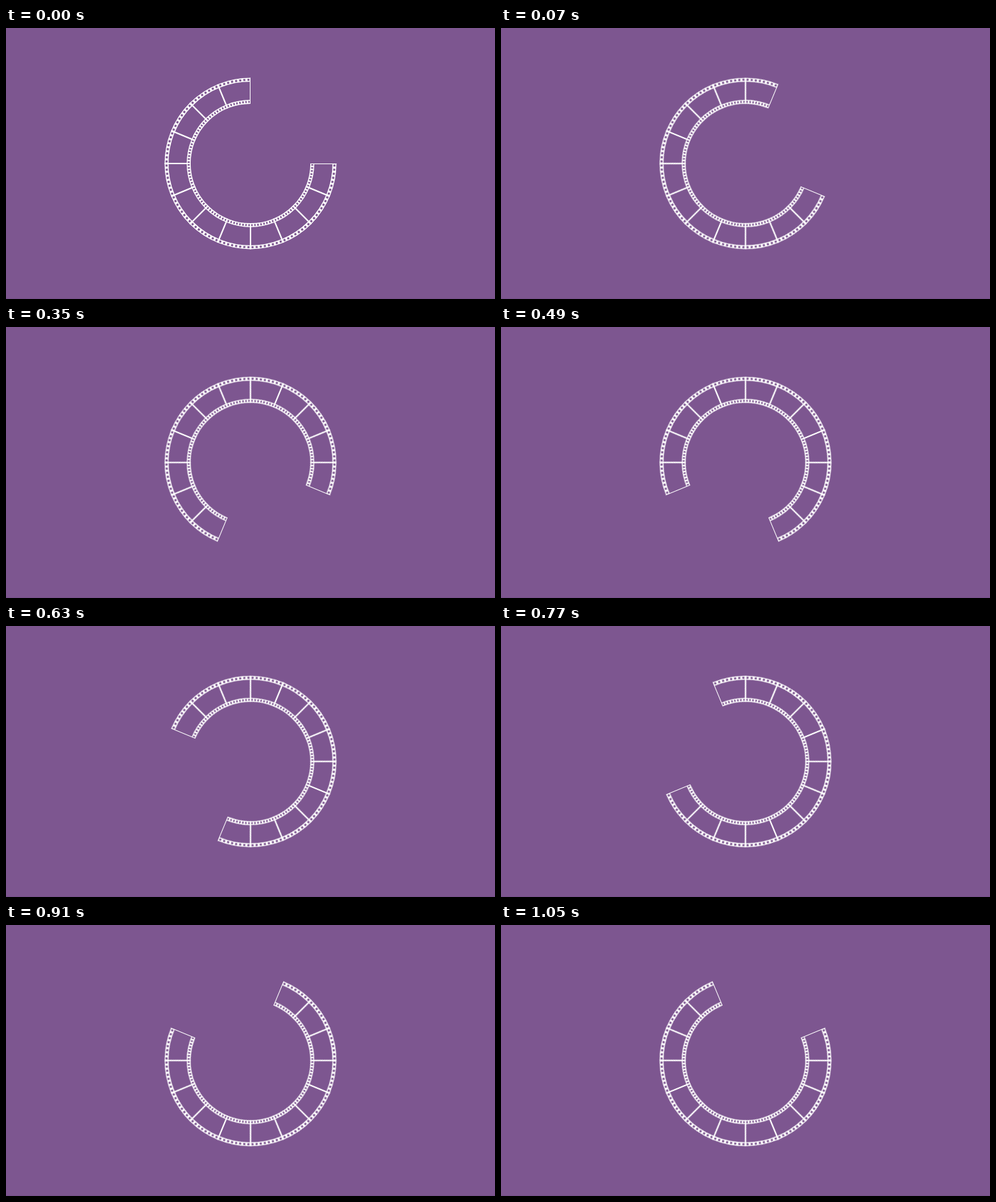
Recreate the animation shown at these times as an HTML page. Size 720 px wide and 400 px high, loop 1.12 s.

```html
<!DOCTYPE html>
<html lang="en">
<head>
<meta charset="utf-8">
<title>Film strip loader</title>
<style>
  html, body { margin: 0; width: 100%; height: 100%; overflow: hidden; background: #7d5690; }
  svg { display: block; width: 720px; height: 400px; }
  path { fill: none; stroke: #fff; }
  .hole { stroke: #7d5690; stroke-dasharray: .5 .5; stroke-dashoffset: -.25; }
</style>
</head>
<body>
<svg viewBox="0 0 720 400">
  <path d="M0 399.5H720" style="stroke:#75508a"/>
  <g transform="translate(360 200)"><g id="strip"></g></g>
</svg>
<script>
const FRAMES = 12, HOLES = 8, STEPS = 16, STEP_MS = 70;
const strip = document.getElementById('strip');

function addPath(d, width, attrs = {}) {
  const p = document.createElementNS('http://www.w3.org/2000/svg', 'path');
  p.setAttribute('d', d);
  p.setAttribute('stroke-width', width);
  for (const k in attrs) p.setAttribute(k, attrs[k]);
  strip.append(p);
}

// three quarters of a circle, clockwise from the right to the top
const arc = r => `M${r} 0A${r} ${r} 0 1 1 0 ${-r}`;

function addBand(r, width, holeHeight) {
  addPath(arc(r), width);
  addPath(arc(r), holeHeight, { class: 'hole', pathLength: FRAMES * HOLES });
}

addBand(123.6, 5.8, 3);
addBand(91, 5.8, 3);

// the two outermost dividers are half as wide and lie inside the strip
for (let i = 0; i <= FRAMES; i++) {
  const end = i === 0 ? 1 : i === FRAMES ? -1 : 0;
  const y = end * 0.5;
  addPath(`M88.1 ${y}H126.5`, end ? 1 : 2.1, { transform: `rotate(${i * 360 / STEPS})` });
}

strip.animate(
  [{ transform: 'rotate(0deg)' }, { transform: 'rotate(360deg)' }],
  { duration: STEPS * STEP_MS, iterations: Infinity, easing: `steps(${STEPS}, end)` }
).startTime = 0;
</script>
</body>
</html>
```
